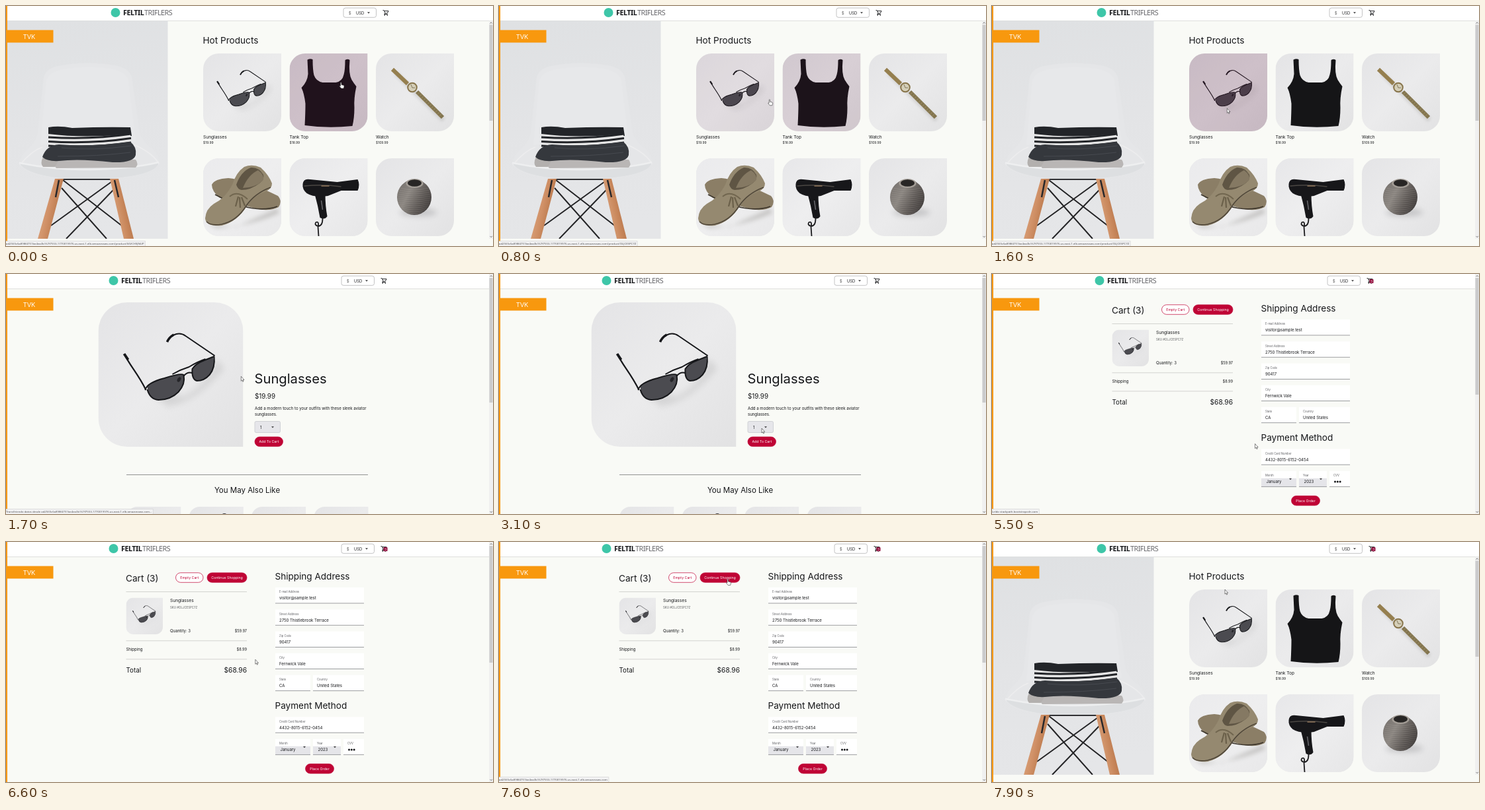
Recreate the animation shown at these times as an HTML page with a canvas. Size 736x364 px, loop 8000 ms.

```html
<!DOCTYPE html>
<html lang="en">
<head>
<meta charset="utf-8">
<title>Shop checkout</title>
<style>
html, body { margin: 0; width: 100%; height: 100%; overflow: hidden; background: #f9faf6; }
canvas { display: block; width: 736px; height: 364px; }
</style>
</head>
<body>
<canvas id="stage"></canvas>
<script>
const W = 736, H = 364, LOOP = 8000;
const stage = document.getElementById('stage');
const dpr = window.devicePixelRatio || 1;
stage.width = W * dpr;
stage.height = H * dpr;
const c = stage.getContext('2d');

const INK = '#16171a', RED = '#bf0435', BG = '#f9faf6', ORANGE = '#f8980e';
const HOST = 'ad2565c6a898f4751be4ea3b167f7553-1770019976.us-east-1.elb.amazonaws.com';

function rect(x, y, w, h, color) {
  c.fillStyle = color;
  c.fillRect(x, y, w, h);
}

function round(x, y, w, h, r, fill, line, lw = 0.7) {
  c.beginPath();
  c.roundRect(x, y, w, h, r);
  if (fill) { c.fillStyle = fill; c.fill(); }
  if (line) { c.strokeStyle = line; c.lineWidth = lw; c.stroke(); }
}

function text(s, x, y, size, color = INK, align = 'left', font = '"Inter", sans-serif', weight = 400) {
  c.font = `${weight} ${size}px ${font}`;
  c.textAlign = align;
  c.fillStyle = color;
  c.fillText(s, x, y);
}

// Paths are SVG strings, so each shape stays on one line.
const fill = (d, color) => { c.fillStyle = color; c.fill(new Path2D(d)); };
function line(d, color, width) {
  c.strokeStyle = color;
  c.lineWidth = width;
  c.stroke(new Path2D(d));
}

function oval(x, y, rx, ry, color, turn = 0) {
  c.beginPath();
  c.ellipse(x, y, rx, ry, turn, 0, 7);
  c.fillStyle = color;
  c.fill();
}

function fade(x0, y0, x1, y1, ...colors) {
  const g = c.createLinearGradient(x0, y0, x1, y1);
  colors.forEach((k, i) => g.addColorStop(i / (colors.length - 1), k));
  return g;
}

function soft(blur, draw) {
  c.save();
  c.filter = `blur(${blur}px)`;
  draw();
  c.restore();
}

// Draws a picture of natural size n in a rounded square.
function picture(x, y, size, n, radii, draw, tint = 0) {
  c.save();
  c.beginPath();
  c.roundRect(x, y, size, size, radii.map(r => r * size));
  c.clip();
  c.translate(x, y);
  c.scale(size / n, size / n);
  rect(0, 0, n, n, fade(0, 0, n, n, '#e4e4e6', '#ebebec', '#e2e2e3'));
  if (draw) draw();
  if (tint) rect(0, 0, n, n, `rgba(80,10,48,${0.19 * tint})`);
  c.restore();
}

function sunglasses() {
  soft(5, () => fill('M75 133L130 143Q170 120 178 85L190 100Q150 150 105 158Z', 'rgba(120,120,125,.18)'));
  line('M40 79C46 94 60 108 72 133', INK, 2.2);
  line('M39 78L45 87', INK, 4);
  line('M104 60C112 46 124 45 132 51L176 81', INK, 2);
  line('M104 60Q107 53 114 49', INK, 3.6);
  fill('M74 127Q78 121 100 115Q125 107 129 110Q132 124 121 136Q109 148 91 148Q78 147 75 134Z', '#4b4b50');
  fill('M142 101Q147 93 160 88L174 83Q177 99 168 110Q160 119 149 119Q142 117 142 101Z', '#4b4b50');
  line('M71 133Q73 122 100 115Q125 107 129 110Q132 124 121 136Q109 148 91 148Q78 147 74 132', INK, 2);
  line('M142 101Q147 93 160 88L175 82Q177 99 168 110Q160 119 149 119Q141 117 142 101Z', INK, 2);
  line('M112 109Q124 102 137 98Q150 90 162 86M129 112Q134 105 142 107', INK, 2);
  oval(122, 117, 2.4, 4, '#242428', 0.5);
}

function tankTop() {
  fill('M27 9.500Q31 7.500 35 9Q35 25 37 33Q40 42 50 44H70Q80 42 82 32Q84 25 84 10Q88 7.500 91 10Q89 31 94 40Q97 45 101 50Q97 68 98 82Q98 98 95 110Q58 114 23 109Q24 90 24 76Q22 60 18 52Q27 43 28 31Z', '#151517');
}

function watch() {
  soft(2, () => line('M30 30L60 60L102 101', 'rgba(110,105,100,.2)', 6));
  line('M25 24L48 46', '#957f4f', 6);
  line('M62 58L101 97', '#83754f', 6);
  for (let i = 0; i < 12; i++) {
    const p = 64 + i * 3;
    line(`M${p - 2} ${p - 1}L${p + 2} ${p - 5}`, '#a99a6c', 0.7);
  }
  oval(55, 51.500, 7.8, 7.8, '#87744a');
  oval(55, 51.500, 5.8, 5.8, '#d5cfb8');
  line('M55 52L53 47M55 52L59 52', '#5d5135', 0.7);
}

function loafers() {
  rect(0, 0, 118, 118, fade(0, 0, 118, 118, '#ebebed', '#eeeeef', '#e8e8e9'));
  soft(3, () => fill('M8 100L50 104L112 76L115 83Q70 103 20 106Z', 'rgba(90,85,75,.25)'));
  fill('M13 40Q17 31 38 30Q62 32 113 57Q120 65 114 74Q98 82 75 75L25 60Q13 50 13 40Z', '#8b7e66');
  line('M18 55Q76 86 112 73', '#3e372d', 1.8);
  fill('M3 91Q4 77 16 69Q34 60 44 40Q50 21 62 13Q74 8 87 14Q99 25 104 38Q104 46 95 50Q77 56 66 72Q52 96 28 102Q4 104 3 91Z', '#958970');
  fill('M50 40Q57 20 72 14Q84 13 91 25Q93 32 85 38Q72 48 58 48Q52 47 50 40Z', '#5f5544');
  fill('M60 45Q68 25 83 18Q94 26 90 34Q78 45 60 45Z', '#857963');
  line('M5 96Q12 103 28 100Q51 95 65 72Q78 53 102 44', '#51483a', 1.7);
  line('M40 58Q52 48 67 62', '#71664f', 2);
  line('M53 58L49 73M55 59L56 75M58 59L63 72', '#6b604a', 2.2);
}

function dryer() {
  rect(0, 0, 118, 118, fade(0, 0, 118, 118, '#e7e7e9', '#eeeeef', '#e6e6e7'));
  fill('M20 39Q21 30 31 32L72 36L103 32Q107 40 103 49L78 49L58 57Q37 60 26 53Q19 47 20 39Z', '#17171a');
  fill('M38 54L54 54Q54 72 57 88Q53 94 46 90Q43 72 38 54Z', '#17171a');
  line('M22 42Q50 39 78 43', '#4b4743', 1.5);
  line('M48 42L60 42', '#c49c72', 1);
  line('M48 64L50 78', '#66666b', 1.6);
  line('M50 91Q50 103 43 103Q37 101 40 97Q45 95 43 104L44 118', '#1c1c1e', 1.8);
}

function pot() {
  soft(4, () => oval(64, 82, 28, 6, 'rgba(90,90,92,.25)'));
  oval(58, 59, 26, 27, fade(32, 45, 84, 72, '#77726e', '#8a8580', '#5f5a57', '#3c3837'));
  for (let i = 0; i < 13; i++) {
    const y = 45 + i * 3, r = Math.sqrt(Math.max(0, 650 - (y - 59) ** 2));
    line(`M${58 - r} ${y}Q58 ${y + 6} ${58 + r} ${y}`, 'rgba(215,210,205,.2)', 0.7);
  }
  oval(58.5, 38, 13, 7, '#a49e97');
  oval(58.5, 37.500, 10.5, 5.3, '#282625');
}

function chair() {
  c.save();
  c.beginPath();
  c.rect(2, 22.500, 242.500, 330.500);
  c.clip();
  rect(2, 22, 243, 332, fade(2, 30, 60, 353, '#dfe1e3', '#e3e4e6', '#e5e6e8'));
  fill('M57 108Q61 93 84 90Q122 83 165 90Q186 94 190 108L202 193Q206 205 220 216Q232 226 232 240Q220 257 165 262L86 262Q30 257 20 240Q22 225 36 214Q46 205 48 193Z', '#e5e6e8');
  fill('M61 113Q66 98 92 95Q125 90 158 95Q181 99 185 113L196 206L52 211Z', '#e7e8ea');
  line('M21 241Q38 220 55 214M193 210Q224 224 231 240', '#ededee', 1.5);
  fill('M20 238Q75 250 125 249Q190 248 231 237Q228 254 174 260Q125 266 82 261Q30 255 20 238Z', '#dddfe1');
  line('M20 238Q75 249 125 248Q190 247 231 237', '#eeeff0', 2.5);
  line('M86 264L176 334M163 264L68 333M84 276L152 353M165 276L91 353', '#242426', 2);
  line('M82 263L170 263', '#303033', 2);
  fill('M74 262L87 262L63 353L48 353Z', fade(52, 300, 82, 306, '#dca47d', '#cf8f65', '#b77649'));
  fill('M157 262L170 262L193 353L178 353Z', fade(160, 306, 190, 300, '#daa37d', '#ca895d', '#b16f45'));
  line('M80 264L75 290M164 264L170 290', '#28282b', 2.5);
  fill('M76 233Q120 228 196 233Q201 240 196 245L76 246Q70 240 76 233Z', '#b9b6b5');
  fill('M56 229Q66 233 82 230L74 244L56 244Q51 239 56 229Z', '#b3b0ae');
  fill('M64 184Q80 181 100 185Q150 183 188 184L190 197Q130 203 64 196Z', '#232529');
  fill('M64 194Q120 201 188 194L190 211Q128 219 65 214Z', '#e6e6e6');
  for (const y of [199, 205.5, 212]) line(`M64 ${y}Q128 ${y + 4} 189 ${y - 5}`, '#222428', 3);
  fill('M80 210Q130 214 188 206Q198 214 196 226Q193 238 161 237Q110 231 80 235Q62 236 55 229Q61 211 80 210Z', '#35383d');
  line('M84 215Q130 220 189 212M78 228Q140 228 188 222', '#474a50', 1);
  c.restore();
}

const caret = (x, y) => fill(`M${x - 2} ${y - 1}h4l-2 2.200z`, '#3a3a3c');

function header(dx, items) {
  rect(0, 0, W, 22, '#fff');
  rect(0, 22, W, 0.8, '#d8d9d6');
  oval(165.5 + dx, 10, 7, 7, '#3ec6a8');
  const face = '"Noto Sans", sans-serif';
  c.letterSpacing = '-0.5px';
  text('FELTIL', 177 + dx, 14.200, 10.8, INK, 'left', face, 800);
  const w = c.measureText('FELTIL').width;
  text('TRIFLERS', 177.500 + dx + w, 14.200, 10.8, '#66666a', 'left', face, 300);
  c.letterSpacing = '0px';
  round(510 + dx, 3, 49.500, 14.300, 3, '#fff', '#a9aaab');
  text('$', 518 + dx, 12.500, 5.6, '#555');
  text('USD', 529 + dx, 12.500, 5.7);
  caret(548 + dx, 10.300);
  const x = 569.5 + dx;
  line(`M${x} 6.500h1.600l2 4.500h3.200l1.700-3.500h-6.200M${x + 3.1} 11l-.9 1.500h5`, INK, 0.9);
  oval(x + 2.8, 13.900, 0.8, 0.8, INK);
  oval(x + 6.7, 13.900, 0.8, 0.8, INK);
  if (items) {
    round(x + 4, 8, 6, 6, 1, '#93103f');
    text(items, x + 7, 12.600, 4.2, '#fff', 'center');
  }
}

function scrollbar(top, bottom, thumbEnd) {
  rect(730, top, 6, bottom - top, '#f0f0f0');
  rect(730.500, top + 6, 5, thumbEnd - top - 6, '#cbcbcc');
  line(`M731.500 ${top + 4}l1.700-1.700l1.700 1.700M731.500 ${bottom - 4}l1.700 1.700l1.700-1.700`, '#555', 0.8);
}

function banner() {
  rect(0, 0, 2, H, ORANGE);
  rect(0, 36.500, 71.500, 19, ORANGE);
  text('TVK', 35, 49.600, 9.3, '#fff', 'center');
}

const goods = [
  ['Sunglasses', '$19.99', sunglasses, 219], ['Tank Top', '$18.99', tankTop, 118],
  ['Watch', '$109.99', watch, 118], ['', '', loafers, 118], ['', '', dryer, 118], ['', '', pot, 118]
];
const CARD = [0.2, 0, 0.2, 0.2];

function home(t) {
  const ramp = Math.min(1, Math.max(0, (t - 700) / 300));
  const tints = t < 1700 ? [ramp, 1 - ramp] : [];
  header(0, t > 5000 ? 3 : 0);
  chair();
  text('Hot Products', 297.5, 56.500, 13.6);
  goods.forEach(([name, price, draw, n], i) => {
    const x = 298 + (i % 3) * 130.5, y = i < 3 ? 72 : 231;
    picture(x, y, 118, n, CARD, draw, tints[i] || 0);
    text(name, x, 200.500, 6.6);
    text(price, x, 209.200, 4.9);
  });
  scrollbar(22.500, 353, 174);
}

function pill(label, x, y, w, outline) {
  round(x, y, w, 14.600, 7.3, outline ? '#fff' : RED, RED);
  text(label, x + w / 2, y + 9.200, 5.25, outline ? RED : '#fff', 'center');
}

function product(t, hotY) {
  header(-3, 0);
  picture(139.5, 43, 219, 219, [0.2, 0.2, 0, 0.2], sunglasses);
  text('Sunglasses', 375.5, 166, 20.2);
  text('$19.99', 376, 188.500, 9.8);
  text('Add a modern touch to your outfits with these sleek aviator', 376, 206, 6.05);
  text('sunglasses.', 376, 215, 6.05);
  round(376, 223.500, 38.500, 17, 2, '#e6e6ea', '#c3c4ca');
  text(t < 4300 ? '1' : '3', 384, 234.700, 6);
  caret(403, 232.300);
  pill('Add To Cart', 376, 247, 42.5);
  rect(182, 304.200, 365, 0.8, '#77787a');
  text('You May Also Like', 364.500, 332, 11.5, INK, 'center');
  for (let i = 0; i < 4; i++) picture(182 + i * 94.400, 353, 82.500, 118, CARD);
  oval(330, 365.500, 3.5, 2.5, '#3a3a3d');
  if (t >= 3400 && t < 4300) options(hotY);
  scrollbar(0, H, 195);
}

function options(hotY) {
  const top = 240.5, step = 11.4;
  rect(376, top, 42, step * 6, '#e6e6ea');
  const hot = Math.max(0, Math.floor((hotY - top) / step));
  rect(376, top + hot * step, 42, step, '#1a73d1');
  [1, 2, 3, 4, 5, 10].forEach((n, i) =>
    text(n, 381, top + i * step + 7.800, 6, i === hot ? '#fff' : INK));
  c.strokeStyle = '#a5a6aa';
  c.lineWidth = 0.6;
  c.strokeRect(376.3, top, 41.400, step * 6);
}

function field(label, value, x, y, w, select) {
  rect(x, y, w, 24, '#fff');
  if (select) {
    rect(x, y + 11, w, 13, '#e5e5e9');
    caret(x + w - 9, y + 12.300);
  }
  rect(x, y + 23.500, w, 0.8, '#85868a');
  text(label, x + 6, y + 8.400, 4.2, '#5c5d61');
  text(value, x + (select ? 7.5 : 6), y + 18.200, 6);
}

function cart() {
  header(-3, 3);
  text('Cart (3)', 181, 59.500, 13.6);
  pill('Empty Cart', 256.5, 46.700, 41.5, true);
  pill('Continue Shopping', 304, 46.700, 60);
  for (const y of [75, 149.500, 177.500]) rect(181.5, y, 182.500, 0.7, '#c3c4c1');
  picture(181.5, 84.500, 55.500, 219, CARD, sunglasses);
  text('Sunglasses', 248, 91.200, 6.6);
  text('SKU #OLJCESPC7Z', 248, 101.200, 4.4, '#58595c');
  text('Quantity: 3', 248, 137.300, 6);
  text('$59.97', 364, 137.300, 5.6, INK, 'right');
  text('Shipping', 181.5, 165.200, 6);
  text('$8.99', 364, 165.200, 5.6, INK, 'right');
  text('Total', 181.5, 198.300, 9.8);
  text('$68.96', 364, 198.300, 10.2, INK, 'right');

  text('Shipping Address', 406.5, 56.500, 13.55);
  field('E-mail Address', 'visitor@sample.test', 407, 69, 134);
  field('Street Address', '2750 Thistlebrook Terrace', 407, 102.300, 134);
  field('Zip Code', '90417', 407, 135.600, 134);
  field('City', 'Fernwick Vale', 407, 168.700, 134);
  field('State', 'CA', 407, 201.800, 53);
  field('Country', 'United States', 464, 201.800, 77);
  text('Payment Method', 406.5, 252.500, 13.55);
  field('Credit Card Number', '4432-8015-6152-0454', 407, 265.300, 134);
  field('Month', 'January', 407, 298.800, 53, true);
  field('Year', '2023', 464, 298.800, 42, true);
  field('CVV', '', 510, 298.800, 31);
  for (let i = 0; i < 3; i++) oval(518.5 + i * 3.800, 315, 1.5, 1.5, INK);
  pill('Place Order', 452.5, 336.500, 43);
  scrollbar(0, H, 183);
}

// Start, end, x and y of each pointer move.
const moves = [
  [500, 1000, 355.3, 155.300], [2400, 3100, 397, 234], [3600, 3900, 387.3, 265],
  [4400, 4700, 397.5, 257.500], [6300, 7000, 345, 56], [7600, 7900, 352, 72]
];

function pointer(t) {
  let x = 505.5, y = 115.5;
  for (const [a, b, nx, ny] of moves) {
    const p = Math.min(1, Math.max(0, (t - a) / (b - a)));
    const e = p * p * (3 - 2 * p);
    x += (nx - x) * e;
    y += (ny - y) * e;
  }
  return [x, y];
}

function cursor(x, y, hand) {
  c.save();
  c.translate(x, y);
  const shape = hand
    ? 'M0 1Q.7-.3 1.400 1L1.500 4L4.800 4.800Q5.700 5.300 5.400 7L4.700 9.500H1.200L-1.400 6.400Q-1.600 5 0 6Z'
    : 'M0 0V7L1.600 5.600L2.600 8L3.700 7.500L2.700 5.200H4.700Z';
  fill(shape, '#fff');
  line(shape, '#333', 0.6);
  c.restore();
}

function status(t) {
  const moving = `Transfiriendo datos desde ${HOST}…`;
  const steps = [
    [0, HOST + '/product/66VCHSJNUP'], [800, HOST + '/product/OLJCESPC7Z'], [1700, moving], [1900, ''],
    [4900, HOST], [5200, moving], [5500, 'Leído stackpath.bootstrapcdn.com'], [5700, ''],
    [7200, HOST], [7700, '']
  ];
  const label = steps.filter(s => s[0] <= t).pop()[1];
  if (!label) return;
  c.font = '400 4.3px "Open Sans", sans-serif';
  const w = c.measureText(label).width + 2;
  rect(0, 356.500, w, 7.500, '#f2f2f3');
  line(`M0 356.500H${w}V364`, '#cfcfd1', 0.6);
  text(label, 0, 362, 4.3, '#4b4b4e', 'left', '"Open Sans", sans-serif');
}

function render(now) {
  const t = Math.floor((now % LOOP) / 100) * 100;
  const [x, y] = pointer(t);
  c.setTransform(dpr, 0, 0, dpr, 0, 0);
  c.lineJoin = 'round';
  rect(0, 0, W, H, BG);
  if (t < 1700 || t >= 7700) home(t);
  else if (t < 5500) product(t, y);
  else cart();
  banner();
  status(t);
  const hand = t < 1600 || (t >= 4600 && t < 5200) || (t >= 7000 && t < 7700);
  cursor(x, y, hand);
  requestAnimationFrame(render);
}
requestAnimationFrame(render);
</script>
</body>
</html>
```
